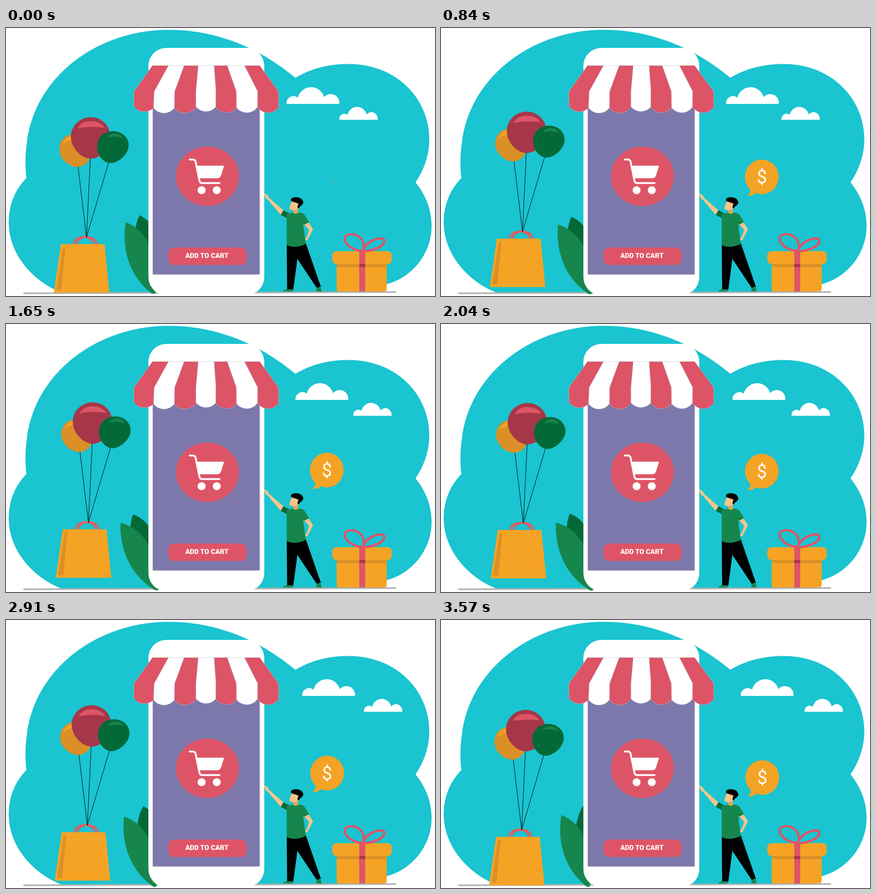
An HTML page that plays this animation: 946 by 592 pixels, repeating every 3.6 s.

```html
<!DOCTYPE html>
<html lang="en">
<head>
<meta charset="utf-8">
<title>Mobile shop</title>
<style>
  html, body { margin: 0; width: 100%; height: 100%; overflow: hidden; background: #fff; }
  svg { display: block; width: 946px; height: 592px; }
  text { font-family: Roboto, sans-serif; fill: #fff; text-anchor: middle; }
  .teal { fill: #1ac4d0; }
  .white { fill: #fff; }
  .rose { fill: #de5467; }
  .wine { fill: #a63748; }
  .gold { fill: #f5a325; }
  .amber { fill: #da9026; }
  .green { fill: #16864c; }
  .forest { fill: #046938; }
  .skin { fill: #f6c589; }
  .line { fill: none; stroke-linecap: round; stroke-linejoin: round; }
</style>
</head>
<body>
<svg viewBox="0 0 946 592">
  <defs>
    <path id="puff" class="white" d="M0 0V-2A15.5 15.5 0 0 1 25 -14A30 30 0 0 1 83 -15A19 19 0 0 1 116.5 -1.5V0Z"/>
  </defs>

  <path class="teal" d="M122 584.5C60 560 6 500 6 430C6 390 20 357 45 331.500C42 310 42 280 46 254C62 112 196 4 360 4C462 4 556 42 638 110C672 90 710 79.500 755 79.500C860 79.500 933 155 933.500 245C933.500 281 922 313 903 341C927 371 938.500 403 938.500 437C938.500 500 894 552 839 566Q815 576 790 583.500Z"/>
  <path d="M38.500 586L860 583.300" stroke="#b2b2b4" stroke-width="3.400"/>

  <use href="#puff" id="cloudA"/>
  <use href="#puff" id="cloudB"/>

  <path id="leafB" class="forest" d="M0 0C-22 40 -14 110 30 165C60 110 50 25 0 0Z"/>
  <path id="leafA" class="green" d="M0 0C-8 50 2 115 58 158L64 158C80 45 24 8 0 0Z"/>

  <!-- phone -->
  <rect class="white" x="314" y="44" width="255.500" height="546" rx="39.500"/>
  <rect x="323.500" y="83" width="236" height="461.500" fill="#7d78ab"/>
  <g id="awning" stroke="#bfbfc3" stroke-width=".7" stroke-linejoin="round"></g>
  <ellipse class="rose" cx="444.300" cy="327.500" rx="69.500" ry="65.500"/>
  <path class="line" stroke="#fff" stroke-width="4" d="M405 290.500H412Q417 290.500 418 295L426.500 337Q427.500 342.500 433 342.500H471"/>
  <path class="white" d="M419 304H479Q481 304 480.300 306.500L474 326Q472 332 465 332H425Z"/>
  <circle class="white" cx="431.300" cy="358.300" r="8.800"/>
  <circle class="white" cx="464.700" cy="358.300" r="8.800"/>
  <rect class="rose" x="358" y="485" width="172.500" height="38.500" rx="13"/>
  <text x="443" y="508.400" font-size="15" font-weight="900">ADD TO CART</text>

  <!-- shopper -->
  <path class="skin" d="M613 404L580 375Q578 369 570 365L569.500 367.500Q572 371 572.500 376L578 380L606 413Z"/>
  <path class="forest" d="M612 402.500L624 409L620 420L605.500 413Z"/>
  <path class="skin" d="M667 429L677 444.500L665.500 467Q663 470 659.500 469L659 465.500L662.500 463L668.500 446L658 434Z"/>
  <path d="M619 478L661 475L694.500 572L685 574L642.500 510L633.500 578H620Z"/>
  <path class="green" d="M619 410.500Q626 408 634 408Q639 412 645 407.500Q653 408 657.500 411.500L668.500 429L657 434.500L655 431L661 477Q640 488 619 480Z"/>
  <path d="M634 401L644.500 397L644 408.500Q639 411.500 634 409Z" fill="#dfa654"/>
  <path class="skin" d="M631 381L646 387L644.500 398Q641 402 634 402.500L626 401L624.500 397Z"/>
  <path d="M628 379.500Q629 373.500 641 373.800Q654 375 655.500 385Q655 391 648.500 394L645 399L642.500 396L645 388L631 383Q628 382 628 379.500Z"/>
  <path class="green" d="M620 577H633.500L632.500 582H612Q613 577.500 620 577ZM685 574L693 571L696.500 582H684Z"/>

  <!-- gift -->
  <path class="gold" d="M729 515H839.500V576Q839.500 582 833.500 582H735Q729 582 729 576Z"/>
  <rect class="amber" x="729" y="521" width="110.500" height="7"/>
  <rect class="gold" x="719.500" y="493" width="131" height="28.500" rx="9"/>
  <rect class="rose" x="779" y="493" width="13" height="89"/>
  <rect class="wine" x="779" y="521.500" width="13" height="6.500"/>
  <path class="line" stroke="#de5467" stroke-width="5" d="M786 493C751 488 738 464 753 457C773 450 798 470 786 493C795 469 827 460 833.500 467C839 482 808 493 786 493"/>

  <!-- bag and balloons -->
  <g id="bag">
    <path class="amber" d="M117.500 268C117.500 250 130 235 148 235C170 235 186 255 184 285C184 297 168 307 158 307C138 307 117.500 288 117.500 268Z"/>
    <path class="gold" d="M125 257Q129 241 148 237V247Q134 248 125 257Z"/>
    <path class="wine" d="M187 197C211 197 230 216 230 240C230 263 210 288.500 187 288.500C165 288.500 143 264 143 240C143 216 163 197 187 197Z"/>
    <path class="rose" d="M158 221.500Q166 206 187 206Q208 206 217 220.500Q187 216 158 221.500Z"/>
    <path class="forest" d="M201 262C201 242 216 228 236 228C256 228 270.500 242 270.500 259C270.500 280 246 298.500 231 298.500C215 298.500 201 282 201 262Z"/>
    <path class="green" d="M223 243Q228 233 240 233Q252 233 257.500 244Q240 236 223 243Z"/>
    <path class="line" stroke="#e9595d" stroke-width="3.600" d="M148.500 478.500C151 456 192 456 194 478.500M155 478.500C158 456 198 456 200.500 478.500"/>
    <path class="line" stroke="#000" d="M159 307L177.500 462.500L186 288.500M177.500 462.500L226 298"/>
    <path class="gold" d="M121 477.500H217.500L228 584.500H105.500Z"/>
    <path class="amber" d="M125.500 484.500H131L122 578.500H111Z"/>
  </g>

  <g id="bubble">
    <ellipse class="gold" rx="37.300" ry="38.300"/>
    <path class="gold" d="M-27 23Q-22 36 -32.500 41Q-20 44 -13 35Z"/>
    <text y="14.500" font-size="40">$</text>
  </g>
</svg>

<script>
  const LOOP = 3600, HALF = 1800, STEP = 30, POP = 600;
  const el = id => document.getElementById(id);
  const mix = (a, b, k) => a + (b - a) * k;
  const place = (id, x, y, extra = '') =>
    el(id).setAttribute('transform', `translate(${x} ${y}) ${extra}`);

  // Straight move a -> b in the first half, b -> c in the second.
  const sway = (t, a, b, c) =>
    t < HALF ? mix(a, b, t / HALF) : mix(b, c, (t - HALF) / HALF);

  function buildAwning() {
    const top = [323, 358.5, 393, 424, 459, 488, 526, 559.5];
    const mid = [282, 327, 372, 419, 463, 508, 555, 601];
    const low = [282, 325.5, 371.5, 419, 462.5, 508.5, 554.5, 601.5];
    const edge = [173, 176.5, 176, 174, 174.5, 176, 174.5, 175];
    let out = '';
    for (let i = 0; i < 7; i++) {
      const j = i + 1;
      out += `<path class="${i % 2 ? 'white' : 'rose'}" d="M${top[i]} 83H${top[j]}L${mid[j]} 140` +
        `L${low[j]} ${edge[j]}A28.5 28.5 0 0 1 ${low[i]} ${edge[i]}L${mid[i]} 140Z"/>`;
    }
    el('awning').innerHTML = out;
  }

  function drawBubble(t) {
    const k = Math.min(t / POP, 1);
    const late = t > POP;
    const x = !late ? mix(723.5, 707.5, k)
      : t < HALF ? 707.4 : mix(707.3, 708.6, (t - HALF) / HALF);
    const y = !late ? mix(339.5, 330.8, k)
      : t < HALF ? mix(330.8, 321.4, (t - POP) / (HALF - POP))
      : mix(321.4, 348.4, (t - HALF) / HALF);
    place('bubble', x, y, `scale(${mix(0.04, 1, k)})`);
  }

  function draw(t) {
    place('cloudA', 618.5 + t * 0.0119, 167.7);
    place('cloudB', 735 + t * 0.01863, 202.7, 'scale(.727 .775)');
    place('bag', sway(t, 0, 4.6, 0.2), sway(t, 0, -26.3, 2));
    place('leafA', sway(t, 264, 251.3, 265.8), sway(t, 429, 440.2, 430.8),
      `rotate(${sway(t, 0, -8, 0.7)})`);
    place('leafB', sway(t, 295, 279, 318), sway(t, 413.5, 421, 404.8),
      `rotate(${sway(t, 0, -8, 9)})`);
    drawBubble(t);
  }

  const start = performance.now();
  function tick() {
    const t = (performance.now() - start) % LOOP;
    draw(Math.floor(t / STEP) * STEP);
    requestAnimationFrame(tick);
  }

  buildAwning();
  draw(0);
  requestAnimationFrame(tick);
</script>
</body>
</html>
```
